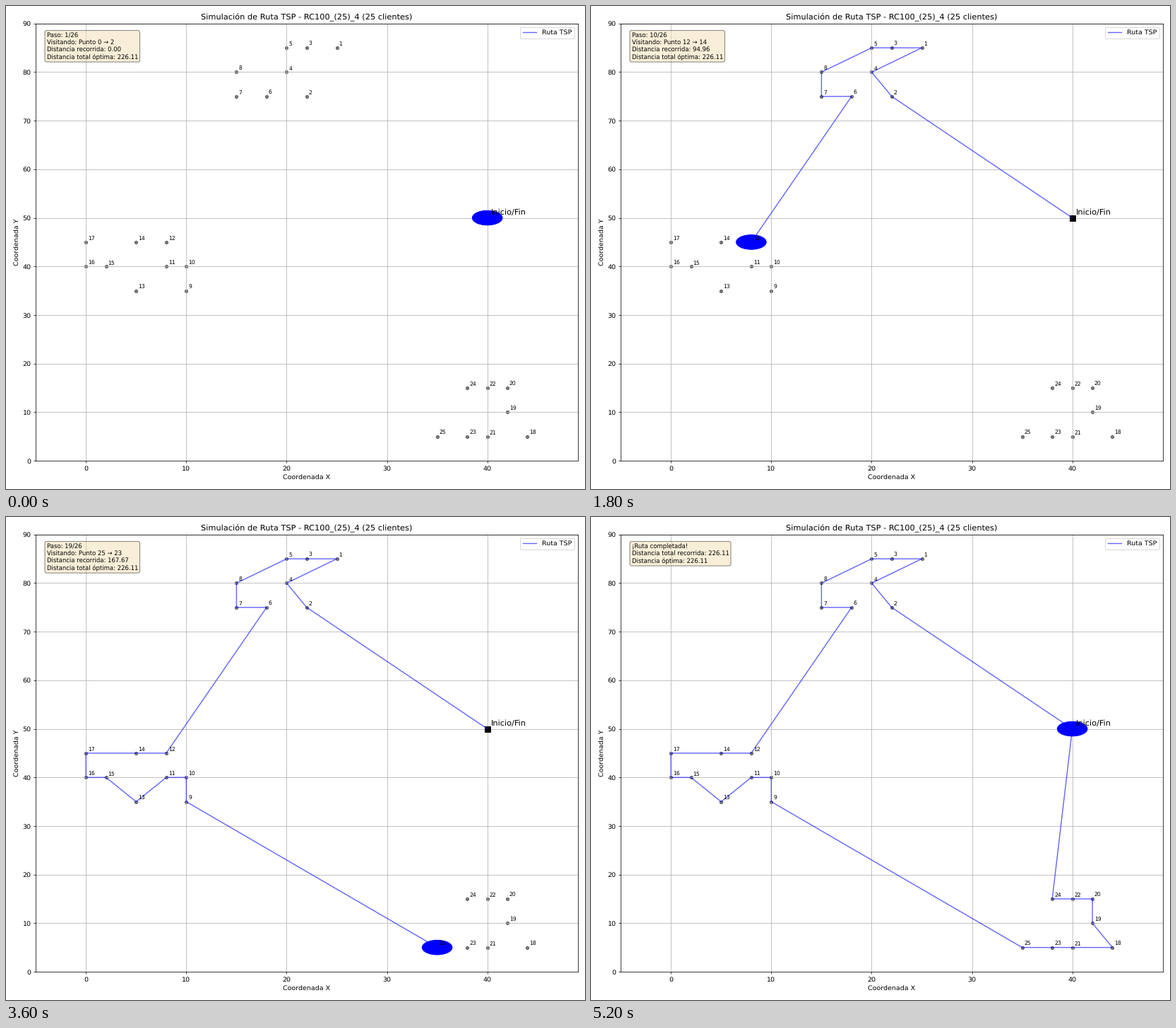
A matplotlib script that plays this animation: 820 by 683 pixels, repeating every 5.4 s.

```python
from itertools import permutations

import matplotlib.pyplot as plt
import numpy as np
from matplotlib.animation import FuncAnimation
from matplotlib.patches import Circle

W, H, DPI = 820, 683, 68.34
STEP_MS = 200

DEPOT = (40, 50)
# Clients per cluster, as rows: y -> x positions
CLUSTERS = [
    {75: (15, 18, 22), 80: (15, 20), 85: (20, 22, 25)},
    {35: (5, 10), 40: (0, 2, 8, 10), 45: (0, 5, 8)},
    {5: (35, 38, 40, 44), 10: (42,), 15: (38, 40, 42)},
]


def number_clients():
    """Number each cluster from right to left, bottom to top."""
    points, groups = [DEPOT], []
    for rows in CLUSTERS:
        cluster = [(x, y) for y, xs in rows.items() for x in xs]
        cluster.sort(key=lambda p: (-p[0], p[1]))
        first = len(points)
        points += cluster
        groups.append(list(range(first, len(points))))
    return np.array(points), groups


def best_order(start, group, following):
    """Shortest way from start through the group towards the following one."""
    orders = np.array(list(permutations(group)))
    cost = (dist[start, orders[:, 0]]
            + dist[orders[:, :-1], orders[:, 1:]].sum(axis=1)
            + dist[:, following].min(axis=1)[orders[:, -1]])
    return orders[cost.argmin()].tolist()


points, groups = number_clients()
dist = np.hypot(*(points[:, None] - points).T)

route = [0]
for group, following in zip(groups, groups[1:] + [[0]]):
    route += best_order(route[-1], group, following)
route.append(0)

path = points[route]
travelled = np.concatenate([[0], np.cumsum(dist[route[:-1], route[1:]])])
total = travelled[-1]
n_legs = len(route) - 1

plt.rcParams.update({"font.family": "DejaVu Sans", "text.hinting": "none"})
fig, ax = plt.subplots(figsize=((W + 0.05) / DPI, (H + 0.05) / DPI), dpi=DPI)
fig.subplots_adjust(left=42.2 / W, right=809.5 / W,
                    bottom=1 - 643.05 / H, top=1 - 24.85 / H)

ax.set(xlim=(-5, 49), ylim=(0, 90), xticks=range(0, 50, 10), yticks=range(0, 100, 10),
       xlabel="Coordenada X", ylabel="Coordenada Y")
ax.set_title("Simulación de Ruta TSP - RC100_(25)_4 (25 clientes)")
ax.grid(True)


def label(text, xy, offset, size):
    ax.annotate(text, xy, xytext=(offset, offset),
                textcoords="offset points", fontsize=size)


ax.scatter(*points[1:].T, s=20, c="black", alpha=0.5)
for i, xy in enumerate(points[1:], 1):
    label(str(i), xy, 3, 8)
ax.plot(*DEPOT, "ks", markersize=8)
label("Inicio/Fin", DEPOT, 5, 12)

line, = ax.plot([], [], "b-", lw=1.5, alpha=0.6, label="Ruta TSP")
vehicle = ax.add_patch(Circle(DEPOT, 1.5, color="blue", zorder=2.5))
info = ax.text(0.02, 0.98, "", transform=ax.transAxes, fontsize=9, va="top",
               bbox=dict(boxstyle="round", facecolor="wheat", alpha=0.5))
ax.legend(loc="upper right")


def status(step):
    if step == n_legs:
        return ("¡Ruta completada!\n"
                f"Distancia total recorrida: {total:.2f}\n"
                f"Distancia óptima: {total:.2f}")
    return (f"Paso: {step + 1}/{n_legs}\n"
            f"Visitando: Punto {route[step]} → {route[step + 1]}\n"
            f"Distancia recorrida: {travelled[step]:.2f}\n"
            f"Distancia total óptima: {total:.2f}")


def update(step):
    line.set_data(*path[:step + 1].T)
    vehicle.center = path[step]
    info.set_text(status(step))
    return line, vehicle, info


anim = FuncAnimation(fig, update, frames=n_legs + 1, interval=STEP_MS, repeat=True)
plt.show()
```
